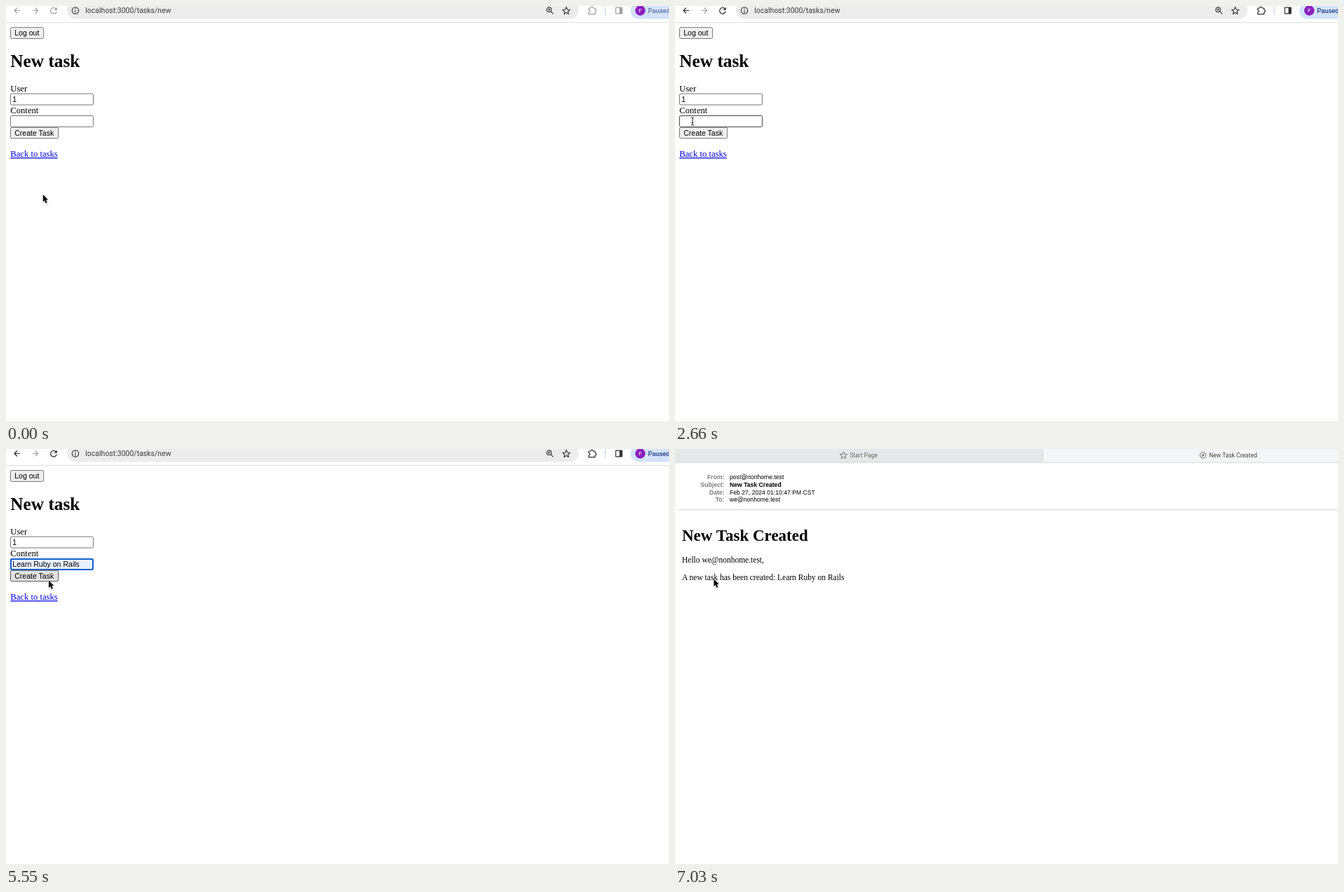
Animation of 946 by 592 pixels, one loop 8000 ms. Source, as an HTML page:

```html
<!DOCTYPE html>
<html lang="en">
<head>
<meta charset="utf-8">
<title>New task</title>
<style>
  html, body { margin: 0; width: 100%; height: 100%; overflow: hidden; background: #fff; }
  svg { display: block; width: 946px; height: 592px; }
  text { white-space: pre; }
  .serif { font-family: "Liberation Serif", "Times New Roman", serif; }
  .sans { font-family: "Liberation Sans", Arial, sans-serif; }
  .ui { font-family: Roboto, Inter, sans-serif; }
  .icon { fill: none; stroke-width: 1.2; stroke-linejoin: round; }
</style>
</head>
<body>
<svg id="stage" viewBox="0 0 946 592" xmlns="http://www.w3.org/2000/svg"></svg>
<script>
const LOOP = 8000;
const stage = document.getElementById('stage');

const text = (x, y, size, font, str, extra = '') =>
  `<text x="${x}" y="${y}" font-size="${size}" class="${font}" ${extra}>${str}</text>`;
const rect = (x, y, w, h, rx, fill, extra = '') =>
  `<rect x="${x}" y="${y}" width="${w}" height="${h}" rx="${rx}" fill="${fill}" ${extra}/>`;
const icon = (d, extra = '') => `<path class="icon" d="${d}" ${extra}/>`;
const star = (cx, cy, r, extra) => {
  const pts = Array.from({ length: 10 }, (_, i) => {
    const a = i * Math.PI / 5 - Math.PI / 2, q = i % 2 ? r * 0.44 : r;
    return (cx + q * Math.cos(a)).toFixed(2) + ' ' + (cy + q * Math.sin(a)).toFixed(2);
  });
  return icon('M' + pts.join('L') + 'Z', extra);
};

const BOLD = 'font-weight="700"';
const BORDER = 'stroke="#767676" stroke-width="1"';
const DARK = 'stroke="#3a3a3a"';

const toolbar = `
  ${rect(87, -5.5, 730, 24, 12, '#ececec')}
  <path d="M0 23.5H946" stroke="#dedede"/>
  <g id="lively" stroke="#333">
    ${icon('M20 6.5H12M16 2.5L12 6.5L16 10.5')}
    ${icon('M71.6 4.4A4.3 4.3 0 1 0 72.2 7.6M72.2 2V5.2H69')}
    ${icon('M831.5 3H834.3A1.7 1.7 0 0 1 837.7 3H840.5V5.6A1.7 1.7 0 0 1 840.5 9V11.6H831.5V9A1.7 1.7 0 0 0 831.5 5.6Z')}
    ${icon('M870 2.2H879V10.8H870Z')}
    <path id="panel" d="M875.3 2H879V11H875.3Z" stroke="none"/>
  </g>
  ${icon('M37.5 6.5H45.5M41.5 2.5L45.5 6.5L41.5 10.5', 'stroke="#a4a4a4"')}
  <circle class="icon" cx="99" cy="6.5" r="4.7" ${DARK}/>
  ${icon('M99 6V9.2M99 3.7V4.9', DARK)}
  ${text(113.3, 10.2, 10.5, 'ui', 'localhost:3000/tasks/new', 'fill="#3c3c3c"')}
  <circle class="icon" cx="774.9" cy="5.2" r="3.3" ${DARK}/>
  ${icon('M777.3 7.6L781 11.3M773.3 5.2H776.5M774.9 3.6V6.8', DARK)}
  ${star(799.5, 7, 5.6, DARK)}
  <path d="M855 1V12" stroke="#cbd6ea" stroke-width="1.4"/>
  ${rect(891, -5.5, 80, 24, 12, '#d3e3fd')}
  <circle cx="905" cy="6.5" r="7.2" fill="#8c1fbd"/>
  ${text(905, 9.4, 8, 'ui', 'F', 'fill="#fff" text-anchor="middle"')}
  ${text(916, 10, 9.4, 'ui', 'Paused', 'id="paused" font-weight="500"')}`;

const form = `
  ${rect(6.5, 30.6, 47.2, 15.8, 2, '#efefef', BORDER)}
  ${text(12.2, 42.2, 10.55, 'sans', 'Log out')}
  ${text(6.3, 87.2, 25.3, 'serif', 'New task', BOLD)}
  ${text(6.3, 121.7, 12.65, 'serif', 'User')}
  ${rect(6.5, 125.1, 118, 15.9, 1.8, '#fff', BORDER)}
  ${text(9.3, 136.8, 10.55, 'sans', '1')}
  ${text(6.3, 153.2, 12.65, 'serif', 'Content')}
  ${rect(6.5, 156.5, 118, 15.9, 1.8, '#fff', BORDER + ' id="field"')}
  ${rect(7, 157, 117, 15, 2, 'none', 'id="ring" stroke="#1560cf" stroke-width="2"')}
  ${text(9.3, 168, 10.55, 'sans', 'Learn Ruby on Rails', 'id="value"')}
  <path id="caret" stroke="#000" stroke-width=".9"/>
  ${rect(6.5, 173.2, 68.2, 15.6, 2, '#efefef', 'id="button"')}
  ${text(12.2, 184.8, 10.55, 'sans', 'Create Task', 'id="label"')}
  ${text(6.3, 215.2, 12.65, 'serif', 'Back to tasks', 'fill="#0000ee" text-decoration="underline"')}
  <g id="popup">
    <path d="M54.5 180H58L65.5 173.5L73 180H176.5Q180.5 180 180.5 184V207.5Q180.5 211.5 176.5 211.5H54.5Q50.5 211.5 50.5 207.5V184Q50.5 180 54.5 180Z"
      fill="#fff" filter="url(#shadow)"/>
    ${text(59.2, 199.2, 9.9, 'ui', 'Learn Ruby on Rails', 'fill="#222"')}
  </g>`;

const headers = [
  ['From:', 'post@nonhome.test'],
  ['Subject:', 'New Task Created', BOLD],
  ['Date:', 'Feb 27, 2024 01:10:47 PM CST'],
  ['To:', 'we@nonhome.test'],
].map(([key, val, style], i) => {
  const y = 43.2 + i * 10.75;
  return text(70.5, y, 8.65, 'sans', key, BOLD + ' fill="#7c7c7c" text-anchor="end"') +
    text(78, y, 8.65, 'sans', val, style);
}).join('');

const mail = `
  ${rect(0, 0, 525, 19, 0, '#e6e7e8')}
  ${rect(525, 0, 421, 19, 0, '#f4f5f7')}
  <path d="M0 19.3H946M525 0V19" stroke="#d6d6d8"/>
  ${star(240.5, 9.2, 5.3, 'stroke="#666" style="stroke-width:.9"')}
  ${text(249.4, 12.1, 8.5, 'ui', 'Start Page', 'fill="#666"')}
  <circle class="icon" cx="753.3" cy="9" r="4.2" stroke="#555" style="stroke-width:.9"/>
  <path d="M755.6 6.7L754.1 9.8L751 11.3L752.5 8.2Z" fill="#555"/>
  ${text(762, 12.1, 8.5, 'ui', 'New Task Created', 'fill="#444"')}
  ${headers}
  <path d="M4 86.8H946" stroke="#d0d0d0"/>
  ${text(10, 131, 23, 'serif', 'New Task Created', BOLD)}
  ${text(10, 162.4, 11.5, 'serif', 'Hello we@nonhome.test,')}
  ${text(10, 187, 11.5, 'serif', 'A new task has been created: Learn Ruby on Rails')}`;

stage.innerHTML = `
  <defs><filter id="shadow" x="-10%" y="-20%" width="120%" height="150%">
    <feDropShadow dx="0" dy=".7" stdDeviation="1.2" flood-opacity=".3"/>
  </filter></defs>
  ${rect(0, 0, 946, 592, 0, '#fff')}
  <g id="app">${toolbar}${form}</g>
  <g id="mail">${mail}</g>
  <g id="arrow"><path d="M0 0V10.4L2.3 8.3L4.1 12.4L5.9 11.6L4.2 7.6H7.3Z" fill="#000"
    stroke="#fff" stroke-width="1" paint-order="stroke" filter="url(#shadow)"/></g>
  <g id="beam"><path d="M-2.2 -5.3Q0 -5.3 0 -4Q0 -5.3 2.2 -5.3M0 -4V4.6M-2.2 5.9Q0 5.9 0 4.6Q0 5.9 2.2 5.9M-1.3 2.4H1.3"
    fill="none" stroke="#222" stroke-width="1"/></g>`;

const el = {};
stage.querySelectorAll('[id]').forEach(n => el[n.id] = n);
const show = (node, on) => node.setAttribute('visibility', on ? 'visible' : 'hidden');
const set = (node, attrs) => { for (const k in attrs) node.setAttribute(k, attrs[k]); };
const within = (t, a, b) => t >= a && t < b;
const mix = (a, b, p) => `rgb(${a.map((v, i) => Math.round(v + (b[i] - v) * p))})`;

// Pointer moves: start, end, steps, x, y
const START = [52.8, 269];
const MOVES = [
  [60, 510, 9, 25.8, 175.5],
  [810, 980, 4, 25.2, 163.7],
  [4030, 4140, 3, 62, 186.5],
  [4200, 4500, 6, 65, 193.5],
  [5330, 5550, 5, 61, 187.5],
  [5610, 5780, 4, 55.5, 185.5],
];

function pointer(t) {
  let [x, y] = START;
  for (const [a, b, n, tx, ty] of MOVES) {
    if (t < a) break;
    const step = Math.floor((t - a) * (n - 1) / (b - a) + 0.001) + 1;
    const p = Math.min(1, step / n), e = p * p * (3 - 2 * p);
    x += (tx - x) * e;
    y += (ty - y) * e;
  }
  return [x, y];
}

function render(t) {
  const [x, y] = pointer(t);
  const focused = within(t, 2830, 6490);
  const filled = t >= 4610;
  const sent = t >= 6490;
  const inMail = t >= 6850;
  const hover = within(t, 4090, 4260) || within(t, 5390, 6490);
  const beam = within(t, 2060, 4200) && y < 173;

  show(el.app, !inMail);
  show(el.mail, inMail);

  const live = t < 1160 ? 0 : Math.min(1, (Math.floor((t - 1160) / 60) + 1) / 3);
  const tone = mix([160, 160, 160], [48, 48, 48], live);
  set(el.lively, { stroke: tone });
  set(el.panel, { fill: tone });
  set(el.paused, { fill: mix([92, 112, 155], [30, 60, 122], live) });

  set(el.field, {
    fill: filled ? '#e8f0fe' : '#fff',
    stroke: within(t, 2060, 2830) ? '#444' : '#767676',
  });
  show(el.ring, focused && !inMail);
  show(el.value, filled && !inMail);
  show(el.popup, within(t, 2830, 4610));

  const caretOn = within(t, 2830, 3310) || within(t, 3850, 4380) ||
    within(t, 4610, 5150) || within(t, 5610, 6140);
  show(el.caret, caretOn);
  set(el.caret, { d: `M${filled ? 105.2 : 9.7} 158.4V170` });

  set(el.button, {
    fill: hover ? '#e2e2e2' : '#efefef',
    stroke: sent ? '#d0d0d0' : hover ? '#555' : '#767676',
  });
  set(el.label, { fill: sent ? '#b0b0b0' : '#000' });

  show(el.arrow, !beam);
  show(el.beam, beam);
  set(el.arrow, { transform: `translate(${x} ${y})` });
  set(el.beam, { transform: `translate(${x - 0.2} ${y + 0.5})` });
}

const begin = performance.now();
function tick() {
  render((performance.now() - begin) % LOOP);
  requestAnimationFrame(tick);
}
tick();
</script>
</body>
</html>
```
